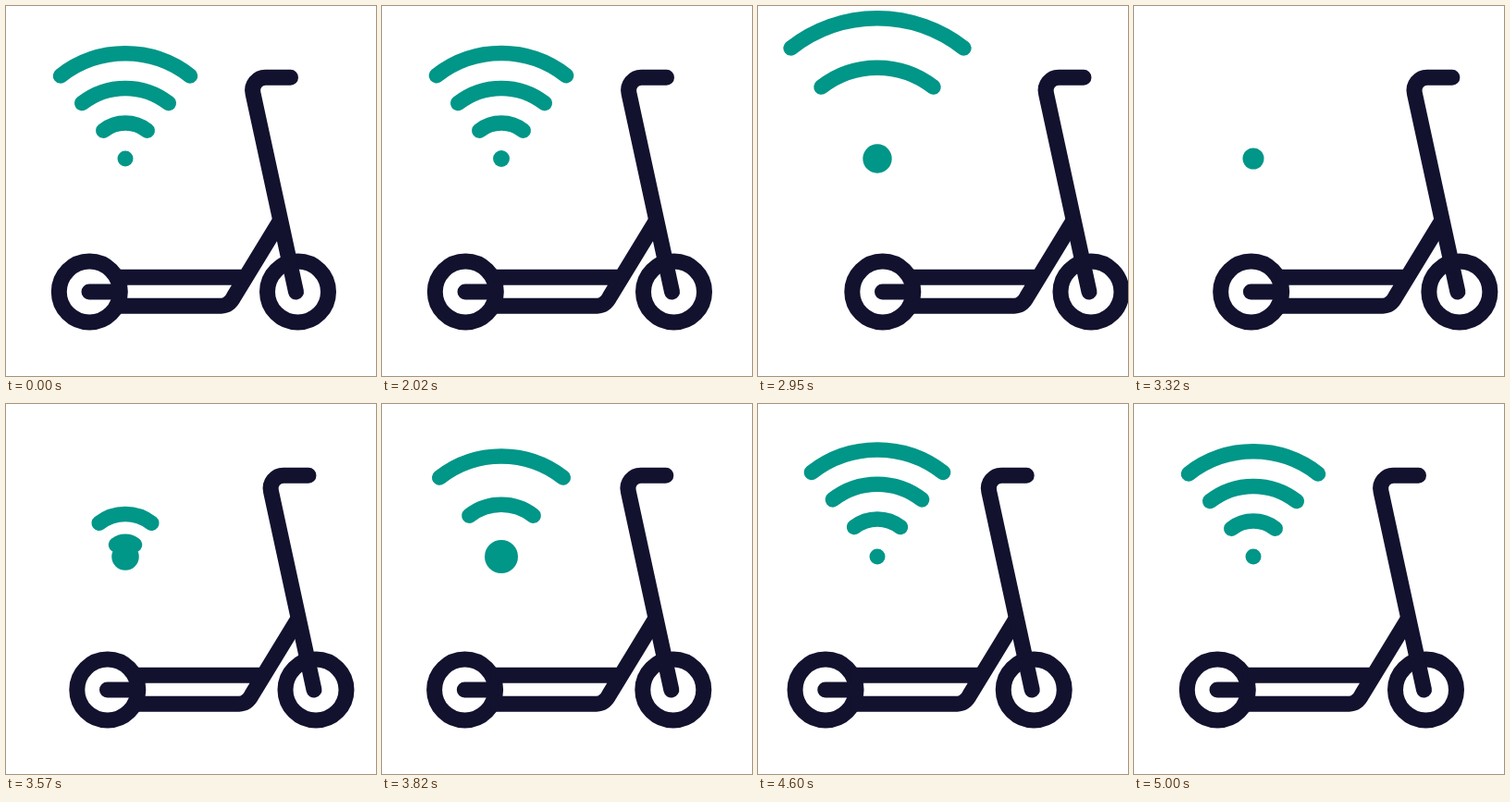
These frames come from a looping animation (400x400 px, 5.02 s). An HTML page:

```html
<!DOCTYPE html>
<html lang="en">
<head>
<meta charset="utf-8">
<title>Connected scooter</title>
<style>
  html, body { margin: 0; width: 100%; height: 100%; overflow: hidden; background: #fff; }
  svg { display: block; width: 100vw; height: 100vh; }
  .line { fill: none; stroke-linejoin: round; }
  .round { stroke-linecap: round; }
  #scooter { stroke: #12122f; stroke-width: 17; }
  #signal { stroke: #009688; stroke-width: 16.5; }
  #dot { fill: #009688; stroke: none; }
</style>
</head>
<body>
<svg viewBox="0 0 400 400">
  <g id="signal" class="line round">
    <circle id="dot" cx="129" cy="165" r="8.5"/>
  </g>
  <g id="scooter" class="line">
    <circle cx="90.3" cy="309" r="33"/>
    <circle cx="315.5" cy="309" r="33"/>
    <path d="M118 293.2H258M118 324.2H232.5Q241.5 324 246.5 314L295.3 234"/>
    <path class="round" d="M90 309H122M307.5 77.2H281A14 14 0 0 0 267 94.5L313.5 309"/>
  </g>
</svg>
<script>
  const LOOP = 5020;
  const MAX_RADIUS = 152;
  const SPREAD = 38 * Math.PI / 180;
  const SPEED = 0.25; // radius per ms

  const smooth = p => (1 - Math.cos(Math.PI * p)) / 2;
  const linear = p => p;
  const easeOut = p => 1 - (1 - p) ** 1.3;

  // Steps are [time, value, easing towards this value].
  const ride = [[2018, 0], [2665, 44.5], [3025, 44.5], [4358, -25], [5005, 0]];
  const pulse = [[2000, 8.5], [2570, 18, easeOut], [2700, 18], [3320, 11.5], [3820, 18], [4220, 12], [4600, 8.5]];

  const leaving = (start, from) =>
    [[0, from], [start, from], [start + (MAX_RADIUS - from) / SPEED, MAX_RADIUS, linear]];
  const passing = start => [[start, 0], [start + MAX_RADIUS / SPEED, MAX_RADIUS, linear]];
  const arriving = (start, mid, peakTime, peak, restTime, rest) =>
    [[start, 0], [4220, mid, linear], [peakTime, peak, easeOut], [restTime, rest], [LOOP, rest]];

  const waves = [
    leaving(2020, 113.7),
    leaving(2030, 76),
    leaving(2050, 38.5),
    passing(2344),
    passing(2558),
    passing(3387),
    arriving(3469, 120, 4330, 129, 4680, 113.7),
    arriving(3850, 73, 4360, 86, 4710, 76),
    arriving(4010, 36.5, 4400, 44, 4740, 38.5)
  ];

  function valueAt(steps, t) {
    if (t <= steps[0][0]) return steps[0][1];
    const i = steps.findIndex(s => s[0] > t);
    if (i < 0) return steps[steps.length - 1][1];
    const [t0, v0] = steps[i - 1];
    const [t1, v1, ease = smooth] = steps[i];
    return v0 + (v1 - v0) * ease((t - t0) / (t1 - t0));
  }

  const scooter = document.getElementById("scooter");
  const signal = document.getElementById("signal");
  const dot = document.getElementById("dot");
  const arcs = waves.map(() =>
    signal.appendChild(document.createElementNS("http://www.w3.org/2000/svg", "path")));

  function arcPath(r) {
    const dx = r * Math.sin(SPREAD);
    const y = 165 - r * Math.cos(SPREAD);
    return `M${129 - dx} ${y}A${r} ${r} 0 0 1 ${129 + dx} ${y}`;
  }

  function draw(t) {
    scooter.setAttribute("transform", `translate(${valueAt(ride, t)} 0)`);
    dot.setAttribute("r", valueAt(pulse, t));
    waves.forEach((steps, i) => {
      const r = valueAt(steps, t);
      const visible = t >= steps[0][0] && r > 3 && r < MAX_RADIUS;
      arcs[i].setAttribute("d", visible ? arcPath(r) : "");
    });
  }

  const begin = performance.now();
  function tick() {
    draw((performance.now() - begin) % LOOP);
    requestAnimationFrame(tick);
  }
  tick();
</script>
</body>
</html>
```
